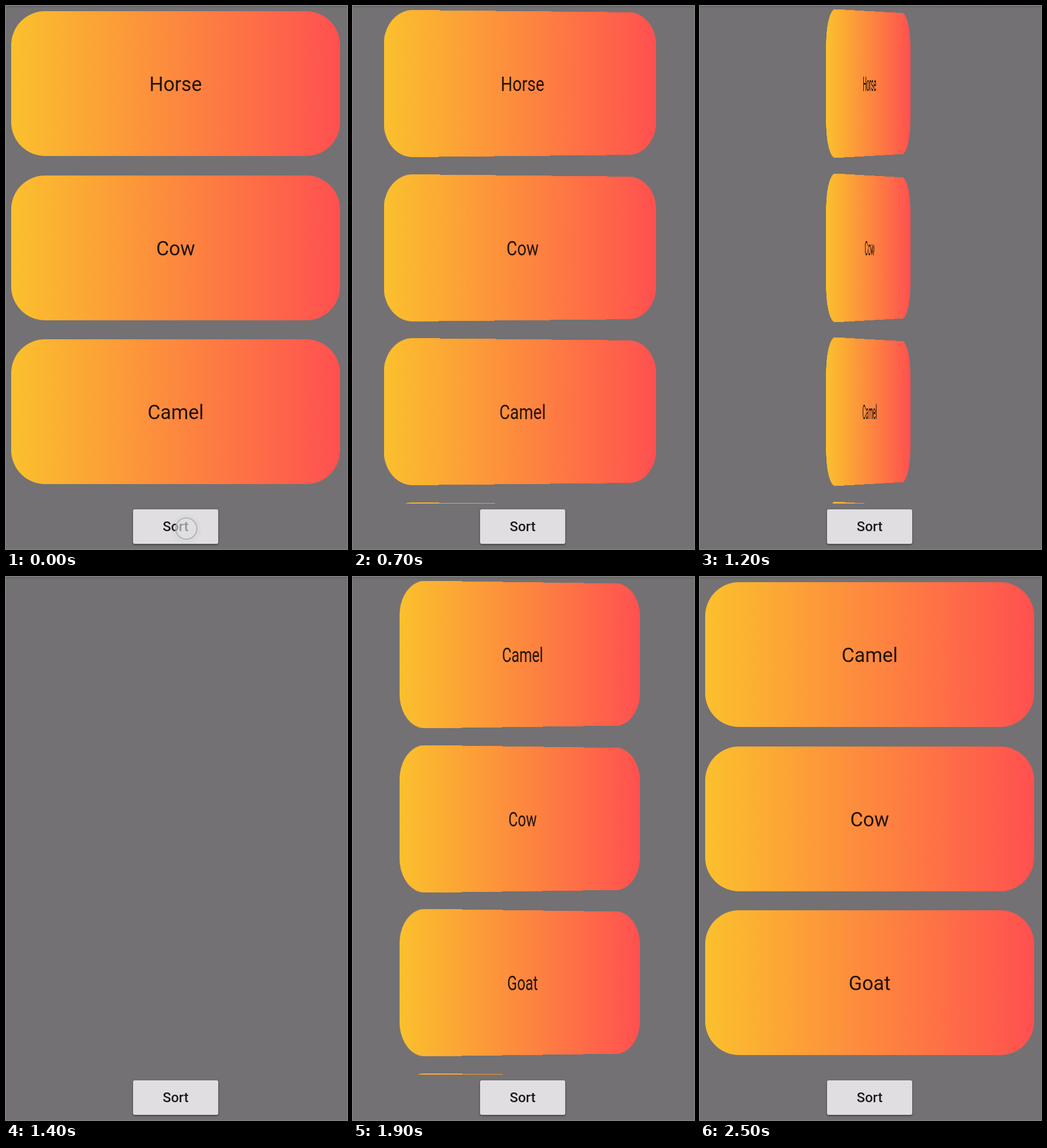
Write an HTML page that moves like this. It is 593 px wide and 945 px high and loops after 2.6 s.

```html
<!DOCTYPE html>
<html lang="en">
<head>
<meta charset="utf-8">
<title>Flip sort</title>
<style>
  html, body { margin: 0; width: 100%; height: 100%; overflow: hidden; background: #737173; }
  body { position: relative; font-family: Roboto, sans-serif; color: rgba(0, 0, 0, .87); text-align: center; }
  #bar { position: absolute; left: 0; top: 0; width: 593px; height: 4px;
    background: linear-gradient(rgba(0, 0, 0, .12), transparent); }
  #list { position: absolute; left: 0; top: 0; width: 593px; height: 866px; overflow: hidden; }
  .card { position: absolute; left: 9px; width: 572px; height: 252px; border-radius: 59px;
    background: linear-gradient(90deg, #fbc02d, #ff5050); font-size: 34.3px; line-height: 254px; }
  #button { position: absolute; left: 221px; top: 876px; width: 148px; height: 60px; border-radius: 3px;
    background: #e0dee1; overflow: hidden; font-size: 24px; font-weight: 500; line-height: 61px;
    }
  #shade { position: absolute; left: 221px; top: 876px; width: 148px; height: 60px; border-radius: 3px;
    box-shadow: 0 2px 3px rgba(0, 0, 0, .3), 0 1px 4px rgba(0, 0, 0, .15); }
  #splash { position: absolute; left: 92px; top: 34px; width: 0; height: 0; border-radius: 50%;
    background: #c8c8c8; transform: translate(-50%, -50%); }
  #label { position: relative; }
  #touch { position: absolute; left: 294px; top: 890px; width: 39px; height: 39px; box-sizing: border-box;
    border: 2px solid rgba(165, 163, 166, .75); border-radius: 50%; background: rgba(226, 224, 227, .62); }
</style>
</head>
<body>
<div id="bar"></div>
<div id="list"></div>
<div id="shade"></div>
<div id="button"><div id="splash"></div><span id="label">Sort</span></div>
<div id="touch"></div>
<script>
const LOOP = 2600, STEP = 100, SWAP = 1400;
const before = ["Horse", "Cow", "Camel", "Goat"];
const after = [...before].sort();
after.splice(1, 2, "Cow", "Goat");

// [time in ms, angle in degrees], joined by straight lines
const turn = [[0, 0], [400, 0], [600, 17.5], [700, 34.1], [1000, 58.6], [1300, 83.5],
  [1400, 90], [1700, 61.3], [2100, 24.8], [2371, 0], [LOOP, 0]];

const get = id => document.getElementById(id);
const splash = get("splash"), touch = get("touch");

const cards = before.map((name, i) => {
  const card = document.createElement("div");
  card.className = "card";
  card.style.top = Math.round(9 + 285.6 * i) + "px";
  get("list").append(card);
  return card;
});

function angleAt(t) {
  const i = turn.findIndex(([time]) => time > t);
  const [t0, a0] = turn[i - 1], [t1, a1] = turn[i];
  return a0 + (a1 - a0) * (t - t0) / (t1 - t0);
}

function draw(t) {
  const angle = angleAt(t);
  const names = t < SWAP ? before : after;
  cards.forEach((card, i) => {
    card.textContent = names[i];
    card.style.transform = angle ? `perspective(8290px) rotateY(${angle}deg)` : "none";
    card.style.visibility = angle > 89.5 ? "hidden" : "visible";
  });

  touch.style.visibility = t < 400 ? "visible" : "hidden";
  const size = 52 + t * .5;
  splash.style.width = splash.style.height = size + "px";
  splash.style.opacity = .2 * Math.max(0, Math.min(1, (600 - t) / 300));
}

// The picture advances ten times a second.
let start = null, shown = -1;
function tick(now) {
  start ??= now;
  const t = Math.floor(((now - start) % LOOP) / STEP) * STEP;
  if (t !== shown) draw(shown = t);
  requestAnimationFrame(tick);
}
draw(0);
requestAnimationFrame(tick);
</script>
</body>
</html>
```
